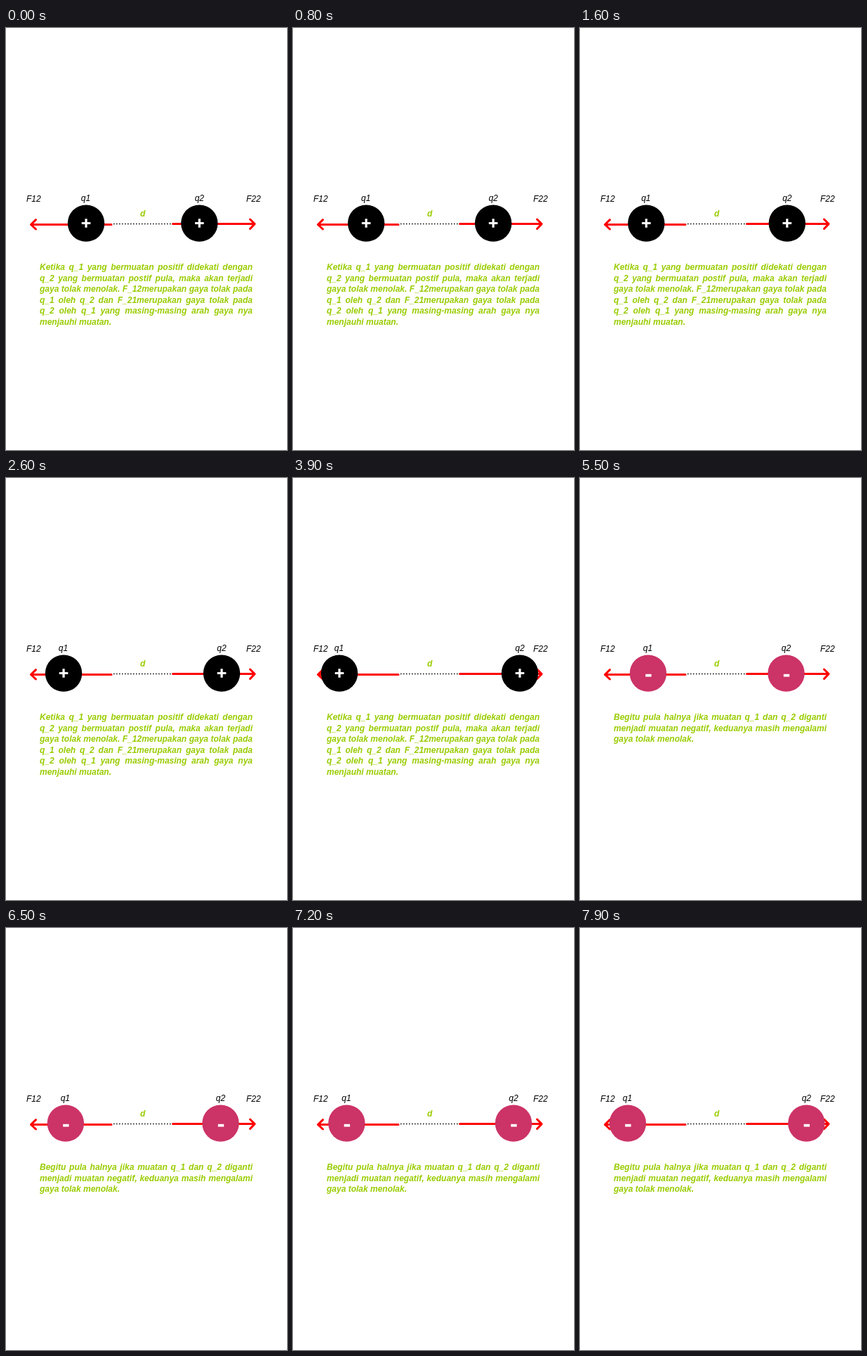
Write an HTML page that moves like this. It is 400x600 px and loops after 8000 ms.

```html
<!DOCTYPE html>
<html lang="id">
<head>
<meta charset="utf-8">
<title>Gaya tolak menolak</title>
<style>
  html, body { margin: 0; width: 100%; height: 100%; overflow: hidden; background: #fff; }
  svg { position: absolute; left: 0; top: 0; }
  svg, .note { font: italic 12px "Liberation Sans", Arial, sans-serif; }
  .note {
    position: absolute; left: 48px; top: 333px; width: 303px;
    line-height: 15.6px; font-weight: bold; color: #9c0;
  }
  .full { text-align: justify; text-align-last: justify; }
  .force { fill: none; stroke: #f00; stroke-width: 3; stroke-linecap: round; stroke-linejoin: round; }
</style>
</head>
<body>
<svg width="400" height="600">
  <path d="M153 278.5H237" stroke="#000" stroke-width="1.5" stroke-dasharray="1.5 2.5"/>
  <path class="force" d="M150 279.5H35.5M42.5 272.7L35.5 279.5L42.5 286"/>
  <path class="force" d="M237.5 278.5H354M347.5 272L354 278.6L347.5 285.5"/>
  <text x="29" y="247">F12</text>
  <text x="342" y="247">F22</text>
  <text x="191" y="268" font-weight="bold" fill="#9c0">d</text>
  <g class="ball">
    <circle cy="277.6" r="26.2"/>
    <path fill="#fff"/>
    <text x="-.5" y="245.5" text-anchor="middle">q1</text>
  </g>
  <g class="ball">
    <circle cy="277.6" r="26.2"/>
    <path fill="#fff"/>
    <text y="245.5" text-anchor="middle">q2</text>
  </g>
</svg>

<div class="note">
  <div class="full">Ketika q_1 yang bermuatan positif didekati dengan<br>
    q_2 yang bermuatan postif pula, maka akan terjadi<br>
    gaya tolak menolak. F_12merupakan gaya tolak pada<br>
    q_1 oleh q_2 dan F_21merupakan gaya tolak pada<br>
    q_2 oleh q_1 yang masing-masing arah gaya nya</div>
  menjauhi muatan.
</div>
<div class="note">
  <div class="full">Begitu pula halnya jika muatan q_1 dan q_2 diganti<br>
    menjadi muatan negatif, keduanya masih mengalami</div>
  gaya tolak menolak.
</div>

<script>
  const LOOP = 8000, STEP = 100, SWITCH = 41;
  const PLUS = "M-6.3 275.9H-1.6V271.2H1.6V275.9H6.3V279.1H1.6V283.8H-1.6V279.1H-6.3Z";
  const MINUS = "M-3.7 278.8H4.7V282.6H-3.7Z";
  const phases = [
    { color: "#000", sign: PLUS, start: 0, x: [114, 275.3], speed: [-1.23, 1.22] },
    { color: "#c36", sign: MINUS, start: SWITCH, x: [113.9, 276.7], speed: [-1.21, 1.2] }
  ];
  const balls = document.querySelectorAll(".ball");
  const notes = document.querySelectorAll(".note");

  function draw() {
    const step = Math.floor(performance.now() % LOOP / STEP);
    const current = step < SWITCH ? 0 : 1;
    const { color, sign, start, x, speed } = phases[current];
    balls.forEach((ball, i) => {
      const pos = x[i] + speed[i] * (step - start);
      ball.setAttribute("transform", `translate(${pos.toFixed(2)} 0)`);
      ball.children[0].setAttribute("fill", color);
      ball.children[1].setAttribute("d", sign);
    });
    notes.forEach((note, i) => note.hidden = i !== current);
    requestAnimationFrame(draw);
  }
  draw();
</script>
</body>
</html>
```
